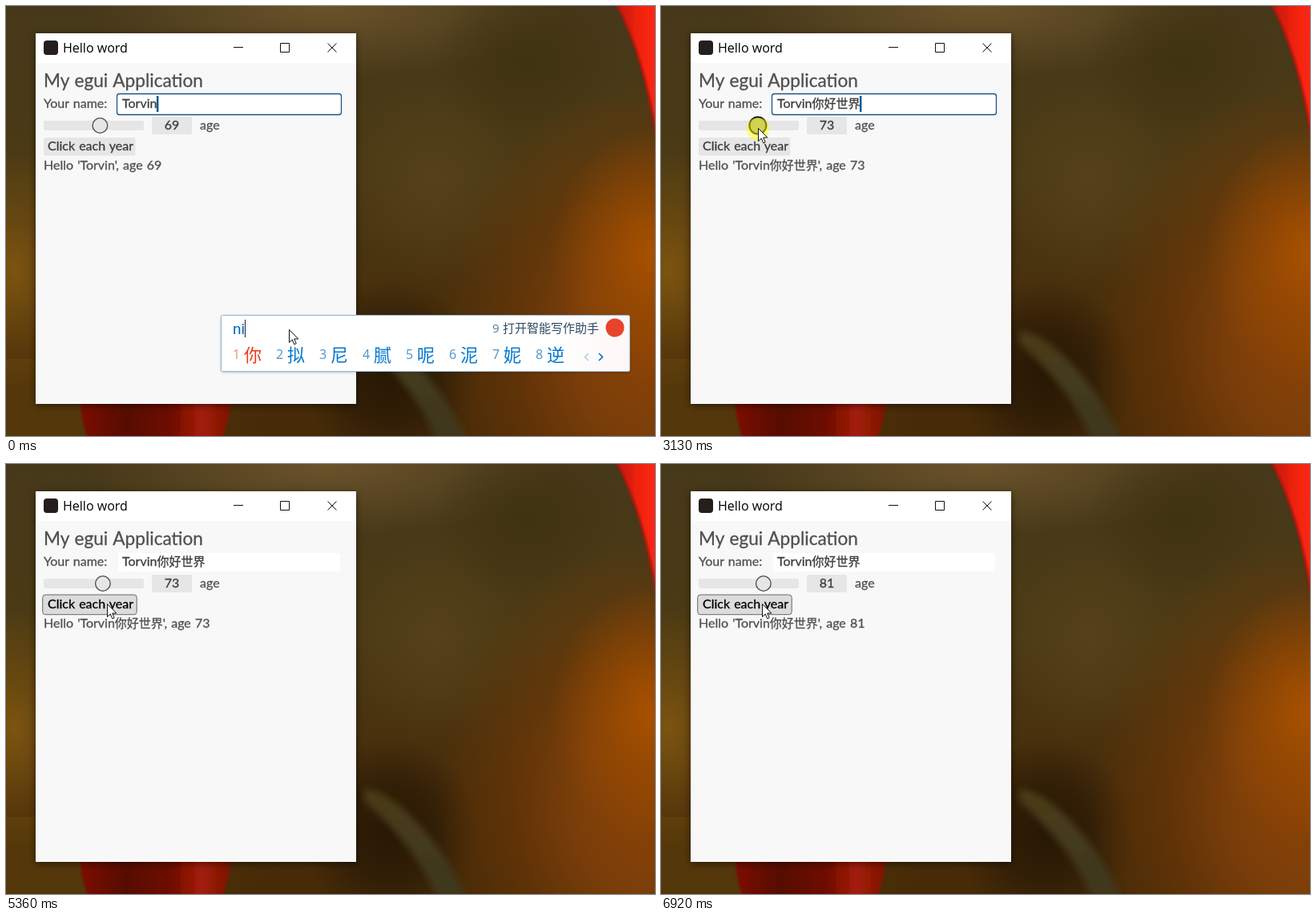
Recreate the animation shown at these times as an HTML page. Size 810x536 px, loop 7050 ms.

```html
<!DOCTYPE html>
<html lang="en">
<head>
<meta charset="utf-8">
<title>Hello word</title>
<style>
html, body { margin: 0; width: 100%; height: 100%; overflow: hidden; }
body {
  background:
    radial-gradient(130px 160px at 810px 310px, #a95100, #a04d0099 45%, #8a440000),
    radial-gradient(270px 330px at 810px 420px, #8a4204, #80400aee 35%, #70380699 65%, #60300600),
    radial-gradient(110px 120px at 480px 460px, #271704, #2a1a06bb 50%, #2a1a0600),
    radial-gradient(120px 100px at 650px 70px, #40330f, #40330f00),
    radial-gradient(110px 130px at 535px 215px, #57431acc, #57431a00),
    radial-gradient(300px 90px at 400px 0, #6b532b, #6b532b00),
    radial-gradient(90px 150px at 10px 330px, #7c5410, #7c541000),
    linear-gradient(90deg, #54370a 10%, #54370a00 40%) 0 440px / 100% 96px no-repeat,
    linear-gradient(#46381a, #4b3a14 40%, #482c09 78%, #472b08);
}
svg { display: block; }
text { white-space: pre; }
.ui { font: 16px Lato, "Noto Sans CJK SC", "Noto Sans CJK", sans-serif; word-spacing: 1px;
  fill: #505050; stroke: #505050; stroke-width: .3px; }
.strong { fill: #3c3c3c; stroke: #3c3c3c; }
.cjk { font-size: 15px; }
.title { font: 16px "Open Sans", sans-serif; }
.typed { font: 19px Roboto, sans-serif; fill: #0068b8; }
.num { font: 16px "Open Sans", sans-serif; fill: #4b92c8; }
.word { font: 300 22px "Noto Sans CJK SC", "Noto Sans CJK", sans-serif; fill: #0078d0; }
.first .num { fill: #f08a70; }
.first .word { fill: #ee3a18; }
.help { font: 15px "Noto Sans CJK SC", "Noto Sans CJK", sans-serif; fill: #2d4a63; }
</style>
</head>
<body>
<svg width="810" height="536" viewBox="0 0 810 536">
  <defs>
    <filter id="soft" x="-20%" y="-20%" width="140%" height="140%"><feGaussianBlur stdDeviation="4"/></filter>
    <filter id="edge"><feGaussianBlur stdDeviation="1"/></filter>
    <filter id="shadow" x="-10%" y="-10%" width="120%" height="120%">
      <feDropShadow dx="0" dy="2" stdDeviation="5" flood-color="#000" flood-opacity=".5"/>
    </filter>
    <filter id="lift" x="-5%" y="-10%" width="110%" height="120%">
      <feDropShadow dx="0" dy="1" stdDeviation="1.5" flood-color="#000" flood-opacity=".2"/>
    </filter>
    <linearGradient id="leaf" x2="0" y2="1"><stop stop-color="#4a3a18"/><stop offset=".5" stop-color="#433a1c"/><stop offset="1" stop-color="#3f3820"/></linearGradient>
    <linearGradient id="petal"><stop stop-color="#c0180a"/><stop offset=".6" stop-color="#f2230f"/><stop offset="1" stop-color="#fa2a14"/></linearGradient>
    <linearGradient id="bud">
      <stop stop-color="#7c1204"/><stop offset=".3" stop-color="#560800"/><stop offset=".6" stop-color="#6d0c02"/>
      <stop offset=".8" stop-color="#a41d08"/><stop offset="1" stop-color="#7a1604"/>
    </linearGradient>
    <linearGradient id="sheet"><stop offset=".8" stop-color="#fff"/><stop offset="1" stop-color="#fff6f7"/></linearGradient>
  </defs>

  <path d="M447 405C480 402 545 470 574 540H537C520 492 480 450 447 420Z" fill="url(#leaf)" filter="url(#soft)"/>
  <path d="M762 -4Q798 66 813 170V-4Z" fill="url(#petal)" stroke="#b8180a" stroke-width="3" filter="url(#edge)"/>
  <path d="M92 490H281Q279 520 269 540H103Q94 520 92 490Z" fill="url(#bud)" filter="url(#edge)"/>

  <g filter="url(#shadow)">
    <rect x="37" y="34" width="400" height="462" fill="#f8f8f8"/>
    <rect x="37" y="34" width="400" height="37" fill="#fff"/>
  </g>
  <rect x="47" y="43" width="18" height="18" rx="4" fill="#241f1c"/>
  <text class="title" x="71" y="58">Hello word</text>
  <path d="M284 51.5H296M342.5 46.5H353.5V57.5H342.5ZM401.5 46.5L412.5 57.5M412.5 46.5L401.5 57.5" fill="none" stroke="#111"/>

  <text class="ui" x="47" y="101" style="font-size:22.6px">My egui Application</text>
  <text class="ui" x="47" y="127">Your name:</text>
  <rect id="field" fill="#fff"/>
  <text class="ui strong" x="145" y="127" id="name">Torvin<tspan class="cjk added"></tspan></text>
  <rect id="caret" y="112" width="2.5" height="20" fill="#005a8c"/>
  <rect x="47" y="143" width="125" height="12" rx="2" fill="#e6e6e6"/>
  <circle id="thumb" cy="149"/>
  <rect x="182" y="138" width="50" height="22" rx="2" fill="#e6e6e6"/>
  <text class="ui strong age" x="207" y="154" text-anchor="middle"></text>
  <text class="ui" x="242" y="154">age</text>
  <rect id="button"/>
  <text class="ui strong" x="52" y="180" id="caption">Click each year</text>
  <text class="ui" x="47" y="204">Hello 'Torvin<tspan class="cjk added"></tspan>', age <tspan class="age"></tspan></text>

  <g id="popup">
    <rect id="panel" x="268.5" y="385.5" height="70" rx="2" fill="url(#sheet)" stroke="#8fb4d2" filter="url(#lift)"/>
    <text class="typed" x="283" y="409" id="typed"></text>
    <rect id="mark" y="391" width="1" height="22" fill="#223"/>
    <g id="words"></g>
    <g id="tools">
      <text class="num" x="607" y="407" style="font-size:15px;fill:#55799a">9</text>
      <text class="help" x="620" y="407">打开智能写作助手</text>
      <circle cx="760" cy="401" r="11.5" fill="#e8432c"/>
      <path d="M727 433L722.5 437.5L727 442" fill="none" stroke="#a9cfe8" stroke-width="1.5"/>
      <path d="M740 433L744.5 437.5L740 442" fill="none" stroke="#0078d0" stroke-width="1.7"/>
    </g>
  </g>

  <circle id="glow" r="14" fill="#ff0" opacity=".5"/>
  <path id="pointer" d="M.5 .5V16.5L4.3 13L6.8 18.8L9.2 17.7L6.7 12H11.8Z" fill="#fff" stroke="#111"/>
</svg>
<script>
const LOOP = 7050, TICK = 67;
const $ = id => document.getElementById(id);
const set = (node, attrs) => { for (const k in attrs) node.setAttribute(k, attrs[k]); };
const fill = (cls, text) => document.querySelectorAll('.' + cls).forEach(n => { n.textContent = text; });
const show = (node, on) => { node.style.display = on ? '' : 'none'; };

// time, pointer x, pointer y
const path = [
  [0, 353, 403], [880, 353, 403], [950, 353, 388], [1145, 353, 388], [1340, 262, 317],
  [2063, 262, 317], [2130, 259, 317], [2800, 123, 172], [2870, 121, 168], [3060, 121, 153],
  [3130, 121, 152], [3530, 104, 154], [3810, 95, 155], [4003, 95, 155], [4353, 115.6, 156],
  [4420, 118, 156], [4480, 118, 157], [4690, 126, 174], [LOOP, 126, 174]
];
// start, typed letters, candidates
const typing = [
  [0, 'ni', '你 拟 尼 腻 呢 泥 妮 逆'],
  [270, "ni'h", '你好 你会 你还 你和 你很 拟合 南海 你话'],
  [460, "ni'ha", '你哈 你好 你还 你行 泥蛤 你汉 你喊 你孩'],
  [600, "ni'hao", '你好 拟好 你号 尼好 你耗 泥号 你豪 逆号']
];
const POPUP_END = 880, WORLD = 1210;
const DRAG = [3060, 4480], BLUR = 3200;
// press, release
const clicks = [
  [4890, 4980], [5060, 5150], [5240, 5360],
  [5510, 5590], [5680, 5760], [5850, 5930], [6020, 6100], [6190, 6320],
  [6390, 6480], [6610, 6700], [6790, 6920]
];

function pointerAt(t) {
  const i = Math.max(1, path.findIndex(p => p[0] > t));
  const [t0, x0, y0] = path[i - 1], [t1, x1, y1] = path[i];
  const steps = Math.max(1, Math.round((t1 - t0) / TICK));
  const k = Math.floor(steps * (t - t0) / (t1 - t0) + 1e-6) / steps;
  return [x0 + (x1 - x0) * k, y0 + (y1 - y0) * k];
}

// The slider follows the pointer one tick late.
function ageAt(t) {
  if (t < DRAG[0]) return 69;
  if (t < DRAG[1]) return Math.round((pointerAt(t - TICK)[0] - 57) / .875);
  return 70 + clicks.filter(c => c[1] <= t).length;
}

let shownStage = null;
function drawPopup(t) {
  show($('popup'), t < POPUP_END);
  const stage = typing.filter(s => s[0] <= t).pop();
  if (t >= POPUP_END || stage === shownStage) return;
  shownStage = stage;
  const words = stage[2].split(' '), extra = (words[0].length - 1) * 22;
  $('typed').textContent = stage[1];
  set($('mark'), { x: Math.round(283 + $('typed').getComputedTextLength()) });
  set($('panel'), { width: 510 + 8 * extra });
  set($('tools'), { transform: `translate(${8 * extra})` });
  $('words').innerHTML = words.map((w, i) => {
    const x = 283 + i * (54 + extra);
    return `<g class="${i ? '' : 'first'}"><text class="num" x="${x}" y="440">${i + 1}</text>` +
      `<text class="word" x="${x + 14}" y="443">${w}</text></g>`;
  }).join('');
}

function draw(t) {
  const [x, y] = pointerAt(t), age = ageAt(t);
  const dragging = t >= DRAG[0] && t < DRAG[1];
  const pressed = clicks.some(c => c[0] <= t && t < c[1]);
  const hover = !dragging && x > 47 && x < 162 && y > 164 && y < 187;
  const focus = t < BLUR;

  fill('added', t < POPUP_END ? '' : t < WORLD ? '你好' : '你好世界');
  fill('age', age);
  set($('field'), focus
    ? { x: 138.5, y: 109.5, width: 280, height: 26, rx: 3, stroke: '#1c5583', 'stroke-width': 1.3 }
    : { x: 140, y: 111, width: 277, height: 23, rx: 2, stroke: 'none' });
  show($('caret'), focus);
  if (focus) set($('caret'), { x: 144.5 + $('name').getComputedTextLength() });

  set($('thumb'), { cx: 57 + .875 * age, r: dragging ? 10.5 : 9.3, fill: dragging ? '#a5a5a5' : '#e6e6e6',
    stroke: dragging ? '#000' : '#4c4c4c', 'stroke-width': dragging ? 2 : 1.3 });
  set($('button'), hover
    ? { x: 45.7, y: 163, width: 117.5, height: 24.7, rx: 3.5, fill: pressed ? '#a5a5a5' : '#dcdcdc', stroke: pressed ? '#000' : '#696969' }
    : { x: 47, y: 164, width: 114.5, height: 22.5, rx: 2, fill: '#e6e6e6', stroke: 'none' });
  $('caption').style.fill = $('caption').style.stroke = hover ? '#000' : '';

  drawPopup(t);
  show($('glow'), dragging || pressed);
  set($('glow'), { cx: x, cy: y + 1 });
  set($('pointer'), { transform: `translate(${Math.round(x)} ${Math.round(y)})` });
}

const start = performance.now();
function frame() {
  draw((performance.now() - start) % LOOP);
  requestAnimationFrame(frame);
}
frame();
</script>
</body>
</html>
```
